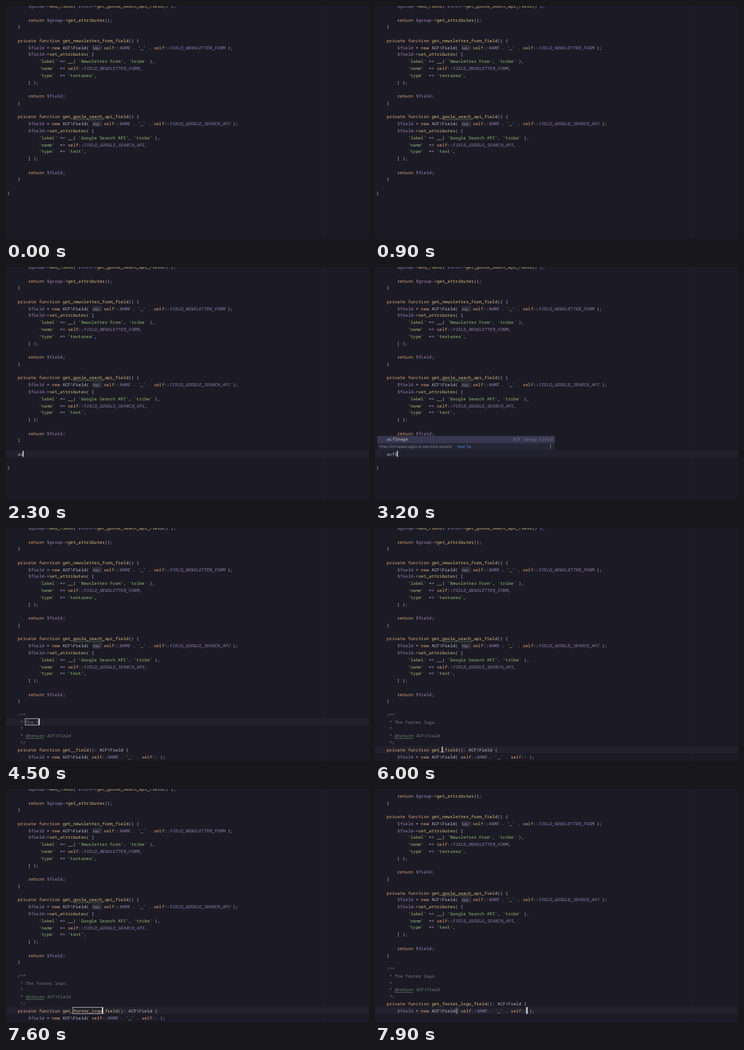
Recreate the animation shown at these times as an HTML page. Size 458 by 295 pixels, loop 8000 ms.

```html
<!DOCTYPE html>
<html>
<head>
<meta charset="utf-8">
<style>
  html, body { margin: 0; width: 100%; height: 100%; overflow: hidden; background: #1c1b25; }
  svg { display: block; width: 458px; height: 295px; }
  text { font: 5.55px "Noto Sans Mono", "DejaVu Sans Mono", monospace; fill: #b9b8c4;
         white-space: pre; text-rendering: geometricPrecision; }
  .keyword { fill: #d7a078; }
  .call { fill: #d3b67c; }
  .variable { fill: #9a7db5; }
  .string { fill: #8fb573; }
  .constant { fill: #8d7ca8; font-style: italic; }
  .comment { fill: #777684; }
  .doc { fill: #62836b; font-style: italic; }
  .tag { text-decoration: underline; }
  .small { font: 4.5px "Open Sans", sans-serif; fill: #9796a5; }
  .link { fill: #5b8fdc; }
  .typo { fill: none; stroke: #799b62; stroke-width: .6; }
</style>
</head>
<body>
<svg id="stage" viewBox="0 0 458 295"></svg>
<script>
const LOOP = 8000, CHAR = 3.335, LINE = 8.77, LEFT = 1.5, HINT = 15;
const stage = document.getElementById('stage');

const fieldMethod = (name, constant, label, type) => [
  `    private function ${name}() {`,
  `        $field = new ACF\\Field( ~self::NAME . '_' . self::${constant} );`,
  `        $field->set_attributes( [`,
  `            'label' => __( '${label}', 'tribe' ),`,
  `            'name'  => self::${constant},`,
  `            'type'  => '${type}',`,
  `        ] );`,
  ``,
  `        return $field;`,
  `    }`,
  ``
];

const base = [
  '        $group->add_field( $this->get_goole_seach_api_field() );',
  '',
  '        return $group->get_attributes();',
  '    }',
  '',
  ...fieldMethod('get_newsletter_form_field', 'FIELD_NEWSLETTER_FORM', 'Newsletter Form', 'textarea'),
  ...fieldMethod('get_goole_seach_api_field', 'FIELD_GOOGLE_SEARCH_API', 'Google Search API', 'text')
];

const snippet = (description, name) => [
  '    /**',
  `     * ${description}`,
  '     *',
  '     * @return ACF\\Field',
  '     */',
  `    private function get_${name}_field(): ACF\\Field {`,
  `        $field = new ACF\\Field( self::NAME . '_' . self:: );`
];

// Latest value whose time has passed: pairs of [ms, value].
const stepAt = (t, steps) => steps.reduce((value, [time, next]) => t >= time ? next : value, 0);

const TYPING = {
  trigger: [[2200, 1], [2300, 2], [2400, 3], [3100, 4]],
  description: [[4200, 1], [4300, 3], [4400, 4], [4500, 5], [5000, 8], [5100, 10],
                [5200, 12], [5400, 14], [5500, 15], [5700, 16]],
  name: [[6300, 1], [6400, 2], [6500, 3], [6600, 4], [6700, 5], [6800, 6],
         [7000, 7], [7200, 8], [7300, 9], [7400, 10], [7500, 11]]
};
const FULL = { trigger: 'acfImage', description: 'The footer logo.', name: 'footer_logo' };
const typed = (t, key) => FULL[key].slice(0, stepAt(t, TYPING[key]));

const colX = col => LEFT + col * CHAR;
const rowY = row => row * LINE;
const rect = (x, y, w, h, style) => `<rect x="${x}" y="${y}" width="${w}" height="${h}" ${style}/>`;
const text = (x, y, body, attrs = '') => `<text x="${x}" y="${y}" ${attrs}>${body}</text>`;
const escape = s => s.replace(/&/g, '&amp;').replace(/</g, '&lt;').replace(/>/g, '&gt;');
const span = (name, s) => `<tspan class="${name}">${escape(s)}</tspan>`;

const TOKEN = /(?<string>'[^']*')|(?<variable>\$\w+)|(?<keyword>\b(?:private|function|return|new|self)\b)|(?<constant>\b(?:NAME|FIELD_\w+))|(?<call>\b[a-z_]\w*(?=\())|(?<plain>[^'$\w]+|\w+)/g;

function highlight(code) {
  if (/^\s*(\/\*|\*)/.test(code)) {
    const [lead, type] = code.split('@return');
    return span('comment', lead) + (type ? span('doc tag', '@return') + span('doc', type) : '');
  }
  return [...code.matchAll(TOKEN)].map(({ groups }) => {
    const [name, value] = Object.entries(groups).find(([, v]) => v !== undefined);
    return span(name, value);
  }).join('');
}

function codeLine(code, row) {
  const y = rowY(row) + 2.1;
  const [head, tail] = code.split('~');
  let out = text(LEFT, y, highlight(head));
  if (tail) {
    const x = colX(head.length);
    out += rect(x + .5, y - 5.2, 12.5, 6.8, 'rx="1.2" fill="#302f39"')
         + text(x + 2, y - .2, 'key:', 'class="small"')
         + text(x + HINT, y, highlight(tail));
  }
  return out;
}

function typoMark(row) {
  let path = `M${colX(25)} ${rowY(row) + 4}`;
  for (let i = 0; i < 19; i++) path += `l1 ${i % 2 ? 1 : -1}l1 0`;
  return `<path class="typo" d="${path}"/>`;
}

const frameBox = (row, col, length) =>
  rect(colX(col) - .6, rowY(row) - 4.3, length * CHAR + 1.2, 8.2, 'fill="none" stroke="#aaa9b7" stroke-width=".8"');
const brace = (row, col) => rect(colX(col), rowY(row) - 4, CHAR, 8, 'fill="#4a495c"');

function popup(narrow) {
  const items = narrow ? ['acfImage'] : ['acfImage', 'acfGroup', 'acfText', 'acfTextarea', 'acfLink',
    'acfSelect', 'acfRadio', 'acfRepeater', 'acfFile', 'acfField'];
  const pitch = 9.1, footer = 223, top = footer - items.length * pitch;
  return rect(3, top, 224, 232 - top, 'fill="#282736"')
    + rect(3, top, 224, pitch, 'fill="#393750"')
    + items.map((item, i) => {
        const y = top + i * pitch + 6.4;
        return text(15, y, item) + text(224, y, 'ACF Group Field', 'text-anchor="end" class="comment"');
      }).join('')
    + rect(3, footer, 224, 9, 'fill="#242635"')
    + text(6, 229, 'Press Ctrl+Space again to see more variants', 'class="small"')
    + text(104, 229, 'Next Tip', 'class="small link"')
    + [225, 227, 229].map(y => rect(221, y - .4, .9, .9, 'fill="#b9b8c4"')).join('');
}

function draw(t) {
  const description = typed(t, 'description'), name = typed(t, 'name'), trigger = typed(t, 'trigger');
  const scrolled = t >= 7700;
  let lines, caret = null, marks = '', overlay = '';

  if (t < 3600) {
    const gap = t < 1800 ? [] : t < 1900 ? [''] : ['    ' + trigger, ''];
    lines = [...base, ...gap, '}'];
    if (t >= 1900) caret = [27, 4 + trigger.length];
    else if (t >= 1800) caret = [26, 4];
    else if (t >= 1200) {
      caret = [25, 5];
      marks = brace(16, 49) + brace(25, 4);
    }
    if (t >= 2500) overlay = popup(t >= 3100);
  } else {
    lines = [...base, ...snippet(description, name)];
    if (t < 6000) {
      caret = [28, 7 + description.length];
      overlay = frameBox(28, 7, description.length);
    } else if (!scrolled) {
      caret = [32, 25 + name.length];
      overlay = name ? frameBox(32, 25, name.length) : '';
    } else {
      caret = [33, 57];
      marks = brace(33, 30);
      overlay = frameBox(33, 57, 0);
    }
  }

  let out = rect(401.5, 0, .7, 295, 'fill="#22212c"');
  let content = '';
  if (caret) content += rect(0, rowY(caret[0]) - 4.4, 458, LINE, 'fill="#22212d"');
  content += marks + lines.map(codeLine).join('') + typoMark(16) + overlay;
  if (caret) content += rect(colX(caret[1]) - .5, rowY(caret[0]) - 4, 1.1, 7.6, 'fill="#f0f0f4"');
  return out + `<g transform="translate(0 ${scrolled ? -LINE : 0})">${content}</g>`;
}

let shown = '';
function tick() {
  const picture = draw(performance.now() % LOOP);
  if (picture !== shown) stage.innerHTML = shown = picture;
  requestAnimationFrame(tick);
}
tick();
</script>
</body>
</html>
```
